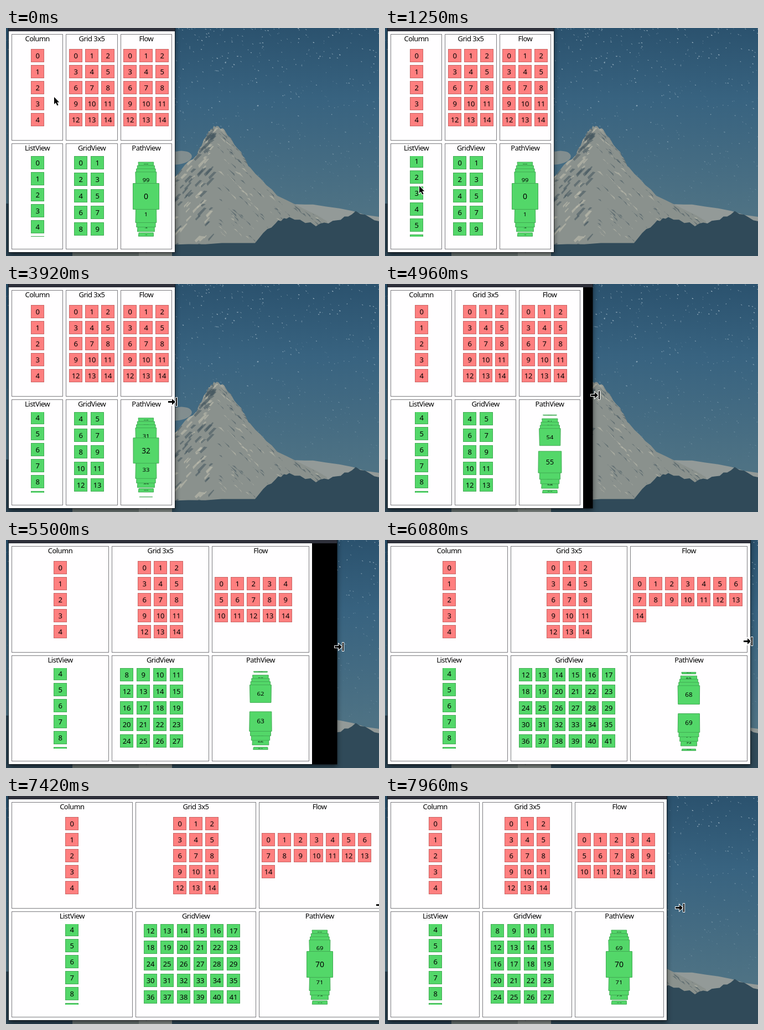
Recreate the animation shown at these times as an HTML page with a canvas. Size 674 by 413 pixels, loop 8000 ms.

```html
<!DOCTYPE html>
<html lang="en">
<head>
<meta charset="utf-8">
<title>Positioners and views</title>
<style>
html, body { margin: 0; width: 100%; height: 100%; overflow: hidden; background: #2f5570; }
canvas { display: block; width: 674px; height: 413px; }
</style>
</head>
<body>
<canvas id="stage" width="674" height="413"></canvas>
<script>
const W = 674, H = 413, LOOP = 8000, STEP = 40;
const FONT = '"Noto Sans", "Open Sans", sans-serif';
const RED = ['#ff7f7f', '#c96464'], GREEN = ['#53d769', '#42ab54'];
const VIEW_TOP = 232, VIEW_H = 146;
const ctx = document.getElementById('stage').getContext('2d');

const smooth = k => k * k * (3 - 2 * k);
const easeOut = k => 1 - (1 - k) ** 2;

// Eased progress from 0 to 1 between two times
function ramp(t, start, end, ease = smooth) {
  return ease(Math.min(1, Math.max(0, (t - start) / (end - start))));
}

function randomizer(seed) {
  return () => (seed = (seed * 16807) % 2147483647) / 2147483647;
}

function trace(c, points) {
  c.beginPath();
  points.forEach(([x, y]) => c.lineTo(x, y));
  c.closePath();
}

/* ---------- desktop ---------- */

function paintSky(c) {
  const sky = c.createLinearGradient(0, 0, 0, 330);
  sky.addColorStop(0, '#2b526e');
  sky.addColorStop(0.4, '#386380');
  sky.addColorStop(1, '#4e7284');
  c.fillStyle = sky;
  c.fillRect(0, 0, W, H);

  const rnd = randomizer(77);
  for (let i = 0; i < 900; i++) {
    const x = rnd() * W, y = rnd() ** 1.3 * 320, len = rnd() * 1.5;
    c.strokeStyle = `rgba(220,233,240,${(0.25 + rnd() * 0.6) * (1 - y / 400)})`;
    c.lineWidth = 0.7 + rnd() * 0.7;
    c.beginPath();
    c.moveTo(x, y);
    c.lineTo(x + 0.7 + len, y + 0.5 + len / 2);
    c.stroke();
  }
}

// Fills everything below a jagged line through a few key points
function ridge(c, points, jag, fill) {
  const rnd = randomizer(31), line = [];
  points.slice(1).forEach(([x1, y1], i) => {
    const [x0, y0] = points[i];
    for (let k = 0; k < 1; k += 0.2) {
      line.push([x0 + (x1 - x0) * k, y0 + (y1 - y0) * k + (rnd() - 0.5) * jag]);
    }
  });
  const end = points[points.length - 1];
  trace(c, [...line, end, [end[0], H], [points[0][0], H]]);
  c.fillStyle = fill;
  c.fill();
}

function paintMountains(c) {
  c.fillStyle = 'rgba(157,157,148,.7)';
  c.beginPath();
  c.ellipse(312, 235, 24, 12, -0.15, 0, 7);
  c.fill();

  ridge(c, [[0, 320], [310, 325]], 4, '#2b4251');
  ridge(c, [[120, 406], [310, 406]], 1, '#6c7674');
  ridge(c, [[480, 322], [555, 319], [674, 342]], 3, '#939a98');
  ridge(c, [[240, 330], [308, 266], [345, 228], [366, 188], [378, 177], [394, 184],
    [425, 226], [441, 254], [490, 303], [580, 350]], 5, '#8a918d');

  c.save();
  c.clip();
  const rnd = randomizer(4242);
  for (let i = 0; i < 420; i++) {
    const y = 178 + rnd() * 225, x = 380 + (rnd() - 0.5) * 2.5 * (y - 165);
    const side = x < 380 ? -0.7 : 0.9, len = 4 + rnd() * 14, thick = 1 + rnd() * 5;
    trace(c, [[x, y], [x + thick, y + 1], [x + side * len + thick / 2, y + len], [x + side * len, y + len * 0.7]]);
    c.fillStyle = rnd() < 0.5 ? 'rgba(68,86,95,.55)' : 'rgba(190,188,174,.6)';
    c.fill();
  }
  c.restore();

  ridge(c, [[300, 395], [450, 388], [487, 352], [512, 343], [560, 357], [598, 349],
    [632, 333], [674, 350]], 5, '#304a59');
}

const desktop = document.createElement('canvas');
desktop.width = W;
desktop.height = H;
paintSky(desktop.getContext('2d'));
paintMountains(desktop.getContext('2d'));

/* ---------- window ---------- */

function label(text, x, y, size, spacing = 0) {
  ctx.font = size + 'px ' + FONT;
  ctx.letterSpacing = spacing + 'px';
  ctx.fillStyle = '#000';
  ctx.textAlign = 'center';
  ctx.fillText(text, x, y);
}

function box(n, left, top, [fill, edge]) {
  const x = Math.round(left), y = Math.round(top);
  ctx.fillStyle = fill;
  ctx.fillRect(x, y, 24, 24);
  ctx.strokeStyle = edge;
  ctx.lineWidth = 1;
  ctx.strokeRect(x + 0.5, y + 0.5, 23, 23);
  label(n, x + 12, y + 17, 13, -0.3);
}

function boxes(count, cols, x, y, pitch, colors) {
  for (let i = 0; i < count; i++) {
    box(i, x + (i % cols) * pitch, y + Math.floor(i / cols) * pitch, colors);
  }
}

function panel(title, x, y, w, h) {
  const left = Math.round(x), right = Math.round(x + w);
  ctx.strokeStyle = '#7b7b7f';
  ctx.lineWidth = 1;
  ctx.strokeRect(left + 0.5, y + 0.5, right - left - 1, h - 1);
  label(title, x + w / 2, y + 13, 13, -0.55);
}

function positioner(count, cols, x) {
  const rows = Math.ceil(count / cols);
  boxes(count, cols, x, 108 - (rows * 29 - 5) / 2, 29, RED);
}

function scrollView(count, cols, x, pitch, scroll) {
  ctx.save();
  ctx.beginPath();
  ctx.rect(0, VIEW_TOP, W, VIEW_H);
  ctx.clip();
  boxes(count, cols, x, VIEW_TOP - scroll, pitch, GREEN);
  ctx.restore();
}

// Card on the wheel, u steps from the middle; it tilts around a line 32px down its 48px height
function card(n, u, cx) {
  const far = Math.abs(u), side = Math.sign(u), reach = u < 0 ? 73 : 77, fast = 21.9;
  const dist = far < 0.2 ? fast * far / 0.2 : fast + (reach - fast) * (far - 0.2) / 4.8;
  const part = dist / reach / 2, scale = 1 - part, angle = side * part * Math.PI;
  const cos = Math.cos(angle), sin = Math.sin(angle);
  const ax = cx + 8 * scale, ay = 305 + side * dist + 8 * scale;
  const corner = (dx, dy) => {
    const k = scale * 1024 / (1024 - dy * sin);
    return [ax + dx * k, ay + dy * cos * k];
  };
  const lo = -31.5, hi = 15.5;
  trace(ctx, [corner(lo, lo), corner(hi, lo), corner(hi, hi), corner(lo, hi)]);
  ctx.fillStyle = GREEN[0];
  ctx.fill();
  ctx.strokeStyle = GREEN[1];
  ctx.lineWidth = 1;
  ctx.stroke();
  ctx.save();
  ctx.translate(cx, ay - 8 * cos * scale);
  ctx.scale(scale, scale * cos);
  label(n, 0, 5, 14);
  ctx.restore();
}

function pathView(cx, pos) {
  const cards = [];
  for (let i = Math.ceil(pos - 4.98); i < pos + 4.98; i++) cards.push(i);
  cards.sort((a, b) => Math.abs(b - pos) - Math.abs(a - pos));
  cards.forEach(i => card((i + 100) % 100, i - pos, cx));
}

/* ---------- motion ---------- */

const listScroll = t => 118 * ramp(t, 1130, 1880, easeOut);
const gridScroll = t => 60 * ramp(t, 2000, 2240);
const wheel = t => 70 * ramp(t, 2862, 6500, k => 1 - (1 - k) ** 1.78);

const contentEdge = t => 305 + 188 * ramp(t, 4500, 5330, k => k ** 2.15)
  + 167 * ramp(t, 5330, 6080, easeOut) + 21 * ramp(t, 6170, 7080) - 172 * ramp(t, 7400, 7960);

// The frame runs ahead of its content while the window grows
const frameEdge = t => contentEdge(t) + 70 * ramp(t, 4500, 6080, k => Math.sin(Math.PI * k) ** 6);

// Arrow path before the resize: time, x, y
const STOPS = [[290, 87, 124], [1080, 62, 320], [1400, 62, 250], [2000, 160, 296], [2240, 164, 236],
  [2750, 246, 325], [2990, 247, 250], [3600, 345, 212], [3860, 301, 213]];

function pointerAt(t) {
  if (t >= 4500) {
    const lead = 9 * ramp(t, 4500, 4960) - 9 * ramp(t, 5330, 6080) + 28 * ramp(t, 7400, 7960);
    return [frameEdge(t) - 4 + lead,
      213 - 12 * ramp(t, 4500, 4960) - 18 * ramp(t, 4960, 6080) + 19 * ramp(t, 6200, 7960)];
  }
  let [, x, y] = STOPS[0];
  for (let i = 1; i < STOPS.length; i++) {
    const [t0, x0, y0] = STOPS[i - 1], [t1, x1, y1] = STOPS[i], k = ramp(t, t0, t1);
    x += (x1 - x0) * k;
    y += (y1 - y0) * k;
  }
  return [x, y];
}

function outlined(points) {
  trace(ctx, points);
  ctx.strokeStyle = '#fff';
  ctx.lineWidth = 2;
  ctx.stroke();
  ctx.fillStyle = '#000';
  ctx.fill();
}

function pointer(t) {
  const [x, y] = pointerAt(t);
  ctx.save();
  ctx.translate(Math.round(x), Math.round(y));
  if (t > 3830) {
    outlined([[6, -7], [8, -7], [8, 8], [6, 8]]);
    outlined([[-8, -1], [-1, -1], [-1, -5], [5, 0.5], [-1, 6], [-1, 2], [-8, 2]]);
  } else {
    outlined([[0, 1], [0, 14], [3, 11.2], [5.4, 16.5], [7.6, 15.5], [5.2, 10.4], [9.2, 10.4]]);
  }
  ctx.restore();
}

function drawWindow(t) {
  const edge = Math.round(contentEdge(t)), outer = Math.round(frameEdge(t));
  const pw = (edge - 25) / 3, xs = [0, 1, 2].map(i => 10 + i * (pw + 5));

  ctx.save();
  ctx.shadowColor = 'rgba(0,0,0,.55)';
  ctx.shadowBlur = 9;
  ctx.shadowOffsetY = 3;
  ctx.fillStyle = '#000';
  ctx.fillRect(4.5, -20, outer - 4, 426.5);
  ctx.restore();
  ctx.fillStyle = '#2e303a';
  ctx.fillRect(5, 0, outer - 5, 6);
  ctx.fillStyle = '#fffeff';
  ctx.fillRect(5, 6, edge - 5, 400);

  ['Column', 'Grid 3x5', 'Flow'].forEach((name, i) => panel(name, xs[i], 11, pw, 193));
  ['ListView', 'GridView', 'PathView'].forEach((name, i) => panel(name, xs[i], 209, pw, 192));

  const columnX = xs[0] + pw / 2 - 12, gridCols = Math.floor((pw - 30) / 30);
  positioner(5, 1, columnX);
  positioner(15, 3, xs[1] + pw / 2 - 41);
  positioner(15, Math.floor((pw - 5) / 29), xs[2] + 5);
  scrollView(12, 1, columnX, 29, listScroll(t));
  scrollView(gridCols * 8, gridCols, xs[1] + 15, 30, gridScroll(t));
  pathView(Math.round(xs[2] + pw / 2), wheel(t));
}

// The picture advances in steps of 40 ms
function frame(now) {
  const t = Math.floor(((now + 1) % LOOP) / STEP) * STEP;
  ctx.drawImage(desktop, 0, 0);
  drawWindow(t);
  pointer(t);
  requestAnimationFrame(frame);
}
frame(0);
</script>
</body>
</html>
```
